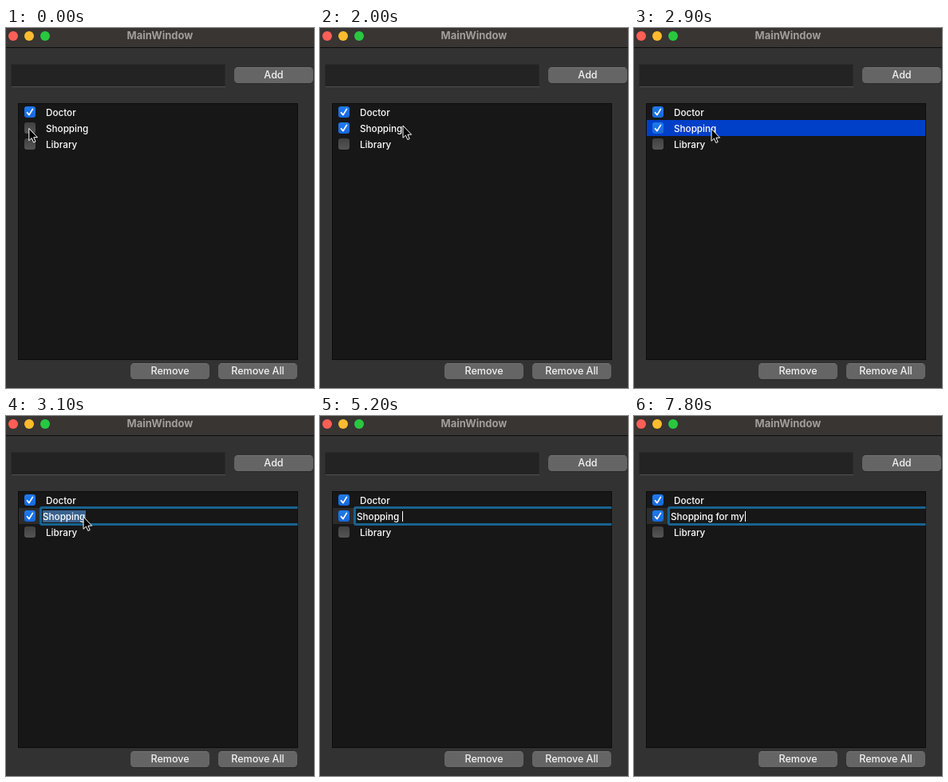
Animation, 386 px wide and 450 px high, one loop 8000 ms. Source, as an HTML page:

```html
<!DOCTYPE html>
<html lang="en">
<head>
<meta charset="utf-8">
<title>MainWindow</title>
<style>
  html, body { margin: 0; width: 100%; height: 100%; overflow: hidden; background: #323232; }
  svg { display: block; width: 100%; height: 100%; }
  text { font-family: Inter, "Liberation Sans", sans-serif; white-space: pre; }
  .title { font-size: 13px; font-weight: 700; fill: #a09d9b; text-anchor: middle; }
  .button { font-size: 12.6px; fill: #f2f2f2; font-weight: 500; text-anchor: middle; letter-spacing: -.05px; }
  .item { font-size: 11.7px; fill: #fff; font-weight: 500; }
</style>
</head>
<body>
<svg viewBox="0 0 386 450">
  <defs>
    <linearGradient id="off" x2="0" y2="1">
      <stop offset="0" stop-color="#414141"/><stop offset="1" stop-color="#555"/>
    </linearGradient>
    <linearGradient id="on" x2="0" y2="1">
      <stop offset="0" stop-color="#1f7af0"/><stop offset="1" stop-color="#1768dc"/>
    </linearGradient>
    <clipPath id="listClip"><rect x="15" y="94" width="350.5" height="321"/></clipPath>
    <g id="empty"><rect x="23" y="-7" width="14" height="14" rx="3.2" fill="url(#off)"/></g>
    <g id="ticked">
      <rect x="23" y="-7" width="14" height="14" rx="3.2" fill="url(#on)"/>
      <path d="M26.6 .8L29 3.6L33.4 -3.6" fill="none" stroke="#fff" stroke-width="1.8" stroke-linecap="round" stroke-linejoin="round"/>
    </g>
    <path id="beamShape" d="M-3.2 -7Q0 -7 0 -4.6Q0 -7 3.2 -7M0 -5V5M-3.2 7Q0 7 0 4.6Q0 7 3.2 7M-2 2.4H2" fill="none" stroke-linecap="round"/>
  </defs>

  <rect width="386" height="450" fill="#323232"/>
  <rect width="386" height="24" fill="#383533"/>
  <rect y="24" width="386" height="1" fill="#0d0d0d"/>
  <circle cx="9" cy="10" r="6" fill="#fe5f57"/>
  <circle cx="29" cy="10" r="6" fill="#febb2e"/>
  <circle cx="49" cy="10" r="6" fill="#28c840"/>
  <text class="title" x="193" y="14">MainWindow</text>

  <rect x="6.5" y="45.5" width="268" height="28" fill="#232323" stroke="#2a2a2a"/>
  <rect x="7" y="73" width="268" height="1" fill="#505050"/>
  <g id="buttons"></g>
  <rect x="15.5" y="94.5" width="350" height="320" fill="#171717" stroke="#0c0c0c"/>

  <rect id="row" x="16" y="115" width="349" height="20"/>
  <use href="#ticked" y="105"/>
  <use id="box" y="125"/>
  <use href="#empty" y="145"/>
  <text class="item" x="50" y="109.5">Doctor</text>
  <text class="item" x="50" y="149.5">Library</text>
  <text class="item" id="label" x="50" y="129.5">Shopping</text>

  <g id="editor" clip-path="url(#listClip)">
    <rect x="43.5" y="114.5" width="330" height="21" rx="1.5" fill="#171717" stroke="#17638f" stroke-width="3"/>
    <rect id="marked" x="46" y="118" width="54" height="15" fill="#3b638f"/>
    <text class="item" id="typed" x="46" y="129.5"></text>
    <rect id="caret" y="119" width="1" height="13" fill="#fff"/>
  </g>

  <path id="arrow" d="M0 0V15.3L3.4 12.1L5.8 17.5L8.2 16.5L5.9 11.2H10.6Z" fill="#000" stroke="#fff" stroke-linejoin="round"/>
  <g id="beam">
    <use href="#beamShape" stroke="#fff" stroke-width="3"/>
    <use href="#beamShape" stroke="#111" stroke-width="1"/>
  </g>
</svg>
<script>
const LOOP = 8000, STEP = 100;
const CHECK = 500, SELECT = 2900, EDIT = 3100, BEAM = 3600, CLICK = 4100, HIDE = 4900;

// Pointer glides: start, end, from, to
const glides = [
  [0, 100, [28.8, 125.5], [28, 125.5]],
  [700, 1200, [28, 125.5], [104, 122]],
  [2000, 2500, [104, 122], [97, 126]],
  [3500, 3900, [97, 126], [111.5, 127]]
];

// Typing: time, text, caret x
const typing = [
  [EDIT, "Shopping", 100],
  [4900, "Shopping ", 103],
  [5900, "Shopping f", 107],
  [6000, "Shopping fo", 114],
  [6200, "Shopping for", 118],
  [6800, "Shopping for ", 121],
  [7500, "Shopping for m", 132],
  [7800, "Shopping for my", 139]
];

// Spans in which the caret is blinked off
const blinks = [[EDIT, CLICK], [4600, 4900], [5500, 5900], [6700, 6800]];

const $ = id => document.getElementById(id);
const show = (id, on) => $(id).setAttribute("visibility", on ? "visible" : "hidden");
const place = (id, [x, y]) => $(id).setAttribute("transform", `translate(${x} ${y})`);
const ease = k => k * k * (3 - 2 * k);

function addButton(x, y, label) {
  $("buttons").innerHTML +=
    `<rect x="${x}" y="${y + 1}" width="99" height="20" rx="4.5" fill="#272727"/>
     <rect x="${x}" y="${y}" width="99" height="20" rx="4.5" fill="#656565"/>
     <rect x="${x + 3}" y="${y}" width="93" height="1" fill="#747474"/>
     <text class="button" x="${x + 49.5}" y="${y + 14}">${label}</text>`;
}

function pointerAt(t) {
  const [start, end, from, to] = glides.filter(g => g[0] <= t).pop();
  const k = ease(Math.min(1, (t - start) / (end - start)));
  return from.map((v, i) => v + (to[i] - v) * k);
}

function draw(time) {
  const t = Math.floor((time % LOOP) / STEP) * STEP;
  const editing = t >= EDIT;
  $("box").setAttribute("href", t >= CHECK ? "#ticked" : "#empty");

  show("row", t >= SELECT);
  $("row").setAttribute("fill", editing ? "#2c2c2c" : "#003fc8");
  show("label", !editing);
  show("editor", editing);
  show("marked", editing && t < CLICK);

  const [, text, caretX] = typing.filter(k => k[0] <= t).pop() || typing[0];
  $("typed").textContent = text;
  $("caret").setAttribute("x", caretX);
  show("caret", editing && !blinks.some(([a, b]) => t >= a && t < b));

  const pointer = pointerAt(t);
  place("arrow", pointer);
  place("beam", pointer);
  show("arrow", t < BEAM);
  show("beam", t >= BEAM && t < HIDE);
}

addButton(286, 49, "Add");
addButton(156, 419, "Remove");
addButton(266, 419, "Remove All");

const begin = performance.now();
function tick() {
  draw(performance.now() - begin);
  requestAnimationFrame(tick);
}
tick();
</script>
</body>
</html>
```
